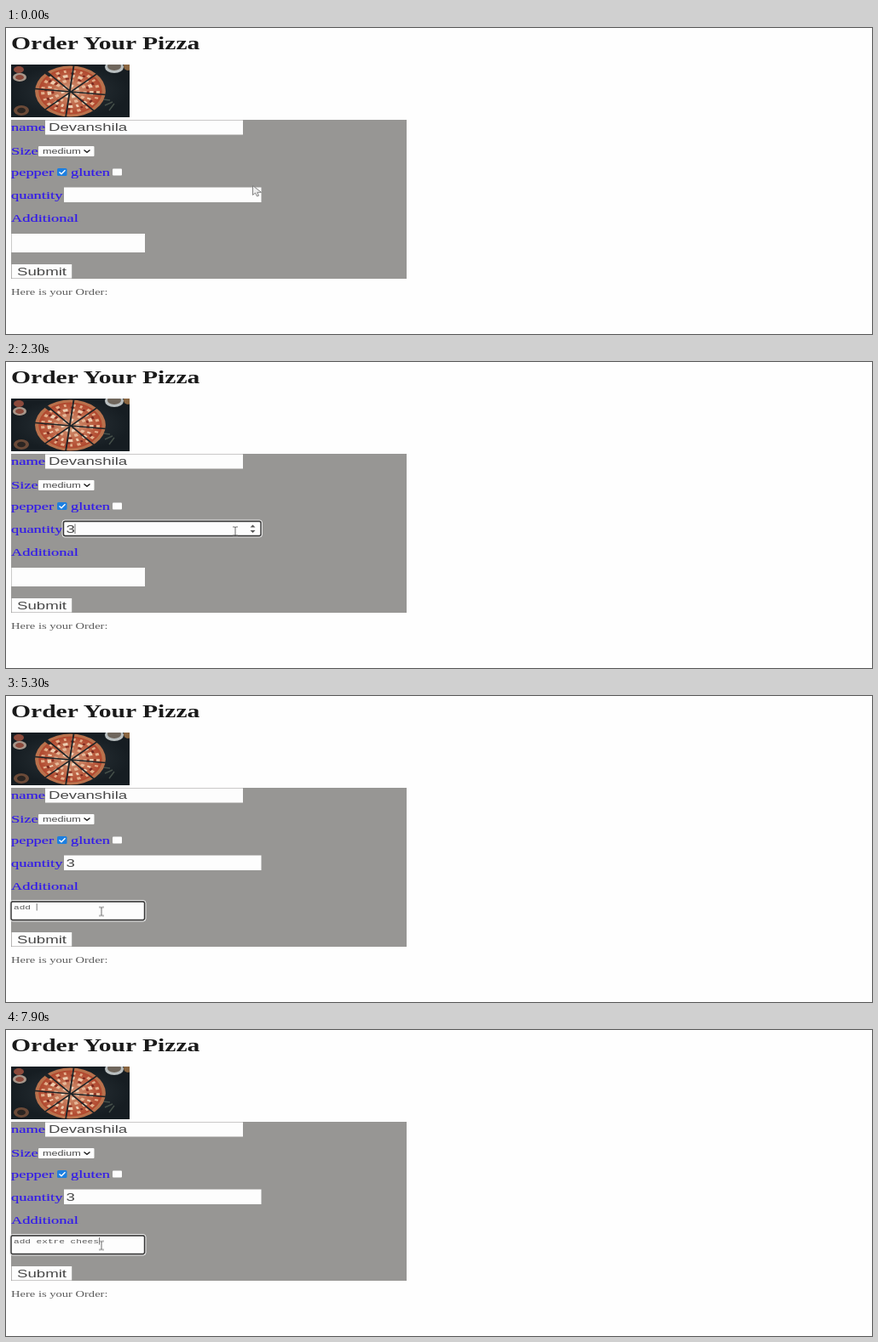
Write an HTML page that moves like this. It is 1016x360 px and loops after 8 s.

```html
<!DOCTYPE html>
<html lang="en">
<head>
<meta charset="utf-8">
<title>Order form</title>
<style>
html, body { margin: 0; width: 100%; height: 100%; overflow: hidden; background: #fefefe; }
svg { display: block; width: 1016px; height: 360px; }

/* the whole page is shown wider than tall */
text { transform-box: fill-box; transform-origin: 0 0; transform: scaleX(1.42); white-space: pre; }
.serif { font-family: "Liberation Serif", "Times New Roman", serif; }
.sans { font-family: "Liberation Sans", Arial, sans-serif; font-size: 13.12px; fill: #484848; }
.mono { font-family: "Liberation Mono", "Courier New", monospace; font-size: 7.825px; fill: #585858; }
.title { font-size: 20.85px; font-weight: bold; fill: #1a1a1a; }
.label { font-size: 12.98px; fill: #3018ec; stroke: #3018ec; stroke-width: .15px; }
.note { font-size: 10.25px; fill: #5c5c5c; }
.small { font-size: 8.9px; }
.field { fill: #fdfdfd; }
.ring { fill: none; stroke: #383838; stroke-width: 1.4; }
.halo { fill: none; stroke: #e6e6e6; stroke-width: 1; }
.caret { stroke: #777; stroke-width: 1; }

.spin, .qfocus, .three, .qcaret, .tfocus, .tcaret, .beam, .arrow, .pen {
  animation: 8s step-end infinite;
}
.spin { animation-name: spin; }
.qfocus { animation-name: qfocus; }
.three { animation-name: three; }
.qcaret { animation-name: qcaret; }
.tfocus { animation-name: tfocus; }
.tcaret { animation-name: tcaret; }
.beam { animation-name: beam; }
.arrow { animation-name: arrow; }
.pen { --w: 6.667px; animation-name: type; }
.mouse { animation: move 8s infinite; }

@keyframes spin { 0%, 41.25%, 100% { opacity: 0 } 2.5% { opacity: 1 } }
@keyframes qfocus { 0%, 41.25%, 100% { opacity: 0 } 12.5% { opacity: 1 } }
@keyframes three { 0% { opacity: 0 } 25%, 100% { opacity: 1 } }
@keyframes qcaret {
  0%, 18.75% { opacity: 0; transform: none }
  12.5% { opacity: 1; transform: none }
  25%, 37.5% { opacity: 1; transform: translateX(10px) }
  31.25%, 41.25%, 100% { opacity: 0; transform: translateX(10px) }
}
@keyframes tfocus { 0% { opacity: 0 } 41.25%, 100% { opacity: 1 } }
@keyframes tcaret {
  0%, 47.5%, 68.75% { opacity: 0 }
  41.25%, 53.75%, 70%, 100% { opacity: 1 }
}
@keyframes beam { 0%, 30% { opacity: 0 } 2.5%, 38.75%, 100% { opacity: 1 } }
@keyframes arrow { 0%, 30% { opacity: 1 } 2.5%, 38.75%, 100% { opacity: 0 } }
@keyframes type {
  0% { transform: translateX(0) }
  55% { transform: translateX(var(--w)) }
  57.5% { transform: translateX(calc(2 * var(--w))) }
  60% { transform: translateX(calc(3 * var(--w))) }
  62.5% { transform: translateX(calc(4 * var(--w))) }
  70% { transform: translateX(calc(5 * var(--w))) }
  73.75% { transform: translateX(calc(6 * var(--w))) }
  78.75% { transform: translateX(calc(7 * var(--w))) }
  80% { transform: translateX(calc(8 * var(--w))) }
  81.25% { transform: translateX(calc(9 * var(--w))) }
  85% { transform: translateX(calc(10 * var(--w))) }
  88.75% { transform: translateX(calc(11 * var(--w))) }
  90% { transform: translateX(calc(12 * var(--w))) }
  91.25% { transform: translateX(calc(13 * var(--w))) }
  93.75% { transform: translateX(calc(14 * var(--w))) }
  96.25%, 100% { transform: translateX(calc(15 * var(--w))) }
}
@keyframes move {
  0% { transform: translate(289px, 185px); animation-timing-function: steps(2) }
  2.5% { transform: translate(284px, 192px); animation-timing-function: steps(6) }
  10% { transform: translate(269px, 199px) }
  28.75% { transform: translate(269px, 199px); animation-timing-function: steps(5) }
  35% { transform: translate(110.5px, 239.5px) }
  37.5% { transform: translate(110.5px, 239.5px); animation-timing-function: steps(2) }
  40%, 100% { transform: translate(112px, 253.5px) }
}
</style>
</head>
<body>
<svg viewBox="0 0 1016 360">
  <defs>
    <clipPath id="photo"><rect x="6" y="43" width="139" height="62"/></clipPath>
    <clipPath id="area"><rect x="7" y="243" width="155" height="20"/></clipPath>
    <radialGradient id="table">
      <stop offset="0" stop-color="#2c353a"/>
      <stop offset="1" stop-color="#161d22"/>
    </radialGradient>
    <radialGradient id="cheese">
      <stop offset="0" stop-color="#d29a7a"/>
      <stop offset=".6" stop-color="#c0694a"/>
      <stop offset="1" stop-color="#b0472e"/>
    </radialGradient>
  </defs>

  <text class="serif title" x="6" y="25">Order Your Pizza</text>

  <!-- pizza -->
  <g clip-path="url(#photo)">
    <rect x="6" y="43" width="139" height="62" fill="url(#table)"/>
    <g fill="#8c4a3c">
      <ellipse cx="15" cy="49" rx="6" ry="4"/>
      <ellipse cx="16" cy="58" rx="8" ry="5" fill="#a9988c"/>
      <ellipse cx="16" cy="58" rx="5" ry="3"/>
      <ellipse cx="18" cy="97" rx="9" ry="6" fill="#6b4a38"/>
      <ellipse cx="18" cy="97" rx="5" ry="3.2" fill="#2b2522"/>
    </g>
    <ellipse cx="127" cy="46" rx="11" ry="7" fill="#b9bfc0"/>
    <ellipse cx="127" cy="45" rx="8" ry="5" fill="#6f665c"/>
    <ellipse cx="143" cy="45" rx="5" ry="5" fill="#8a6540"/>
    <path d="M116 91l9-4M121 97l6-8M114 84l8 1" stroke="#46504a" stroke-width="1.4"/>
    <g transform="translate(75.5 74.500) scale(1.38 1)" fill="none">
      <circle r="30" fill="#b9714c"/>
      <circle r="27" fill="url(#cheese)"/>
      <circle r="23.5" stroke="#e3b08c" stroke-width="3" stroke-dasharray="3 4 2 5"/>
      <circle r="18" stroke="#edcdb0" stroke-width="3.2" stroke-dasharray="4 4 2 3"/>
      <circle r="12.5" stroke="#e6b898" stroke-width="3" stroke-dasharray="3 3 3 4"/>
      <circle r="6.5" stroke="#efd2b8" stroke-width="3" stroke-dasharray="3 3"/>
      <circle r="21" stroke="#7c2a20" stroke-width="2" stroke-dasharray="2 9 3 8"/>
      <circle r="15" stroke="#8b3024" stroke-width="2" stroke-dasharray="3 8"/>
      <path d="M-30 -3L30 4M-20 -23L20 23M3 -31L-4 31M23 -21L-22 22" stroke="#1e2427" stroke-width="1.4"/>
      <path d="M-21 -22l4 4" stroke="#1e2427" stroke-width="3"/>
    </g>
  </g>

  <!-- form -->
  <rect x="6" y="108" width="464" height="187" fill="#979694"/>
  <g class="serif label">
    <text x="6" y="121">name</text>
    <text x="6" y="149">Size</text>
    <text x="6" y="174">pepper</text>
    <text x="76" y="174">gluten</text>
    <text x="6" y="201">quantity</text>
    <text x="6" y="228">Additional</text>
  </g>
  <g class="field">
    <rect x="46" y="108.500" width="232" height="17"/>
    <rect x="38" y="139" width="65.500" height="12" rx="1"/>
    <rect x="125" y="165.500" width="11" height="8" rx="1"/>
    <rect x="68" y="187.500" width="231.500" height="17.500"/>
    <rect x="6.500" y="242" width="156.500" height="22"/>
    <rect x="6.700" y="278" width="70.500" height="16.500"/>
  </g>
  <g class="sans">
    <text x="50" y="121">Devanshila</text>
    <text class="small" x="43" y="148">medium</text>
    <text x="13" y="291">Submit</text>
    <text class="three" x="70.500" y="201">3</text>
  </g>
  <path d="M91.500 143.500l3.500 2.800 3.500-2.800" fill="none" stroke="#222" stroke-width="1.6"/>
  <rect x="60" y="165" width="11.500" height="9" rx="1.500" fill="#1c7fe0"/>
  <path d="M62.500 169.500l2.500 2.200 4.500-4.500" fill="none" stroke="#fff" stroke-width="1.4"/>

  <!-- quantity states -->
  <path class="spin" d="M286.500 194.500l3-3 3 3zM286.500 198l3 3 3-3z" fill="#555"/>
  <g class="qfocus">
    <rect class="halo" x="66" y="186" width="234.500" height="20" rx="3"/>
    <rect class="ring" x="67.500" y="187.500" width="231.500" height="17" rx="2"/>
  </g>
  <path class="caret qcaret" d="M71 190.500V202"/>

  <!-- note being typed -->
  <g clip-path="url(#area)">
    <text class="mono" x="9" y="251">add extre chees</text>
    <g class="pen">
      <rect class="field" x="8.800" y="243" width="160" height="20"/>
      <path class="caret tcaret" d="M9.500 244V252.500"/>
    </g>
  </g>
  <g class="tfocus">
    <rect class="halo" x="4.500" y="240.500" width="159.500" height="24.500" rx="3"/>
    <rect class="ring" x="6" y="242" width="156.500" height="21.500" rx="2"/>
  </g>

  <text class="serif note" x="6" y="314.500">Here is your Order:</text>

  <g class="mouse">
    <path class="arrow" d="M.5 .5V11.500L3.500 9 5.500 13 7.500 12.300 5.800 8.300H10.500Z" fill="#eee" stroke="#777" stroke-width=".9"/>
    <path class="beam" d="M-3 -5H-1L0 -4.300 1 -5H3M0 -4.300V4.300M-3 5H-1L0 4.300 1 5H3" fill="none" stroke="#777" stroke-width="1.100"/>
  </g>
</svg>
</body>
</html>
```
